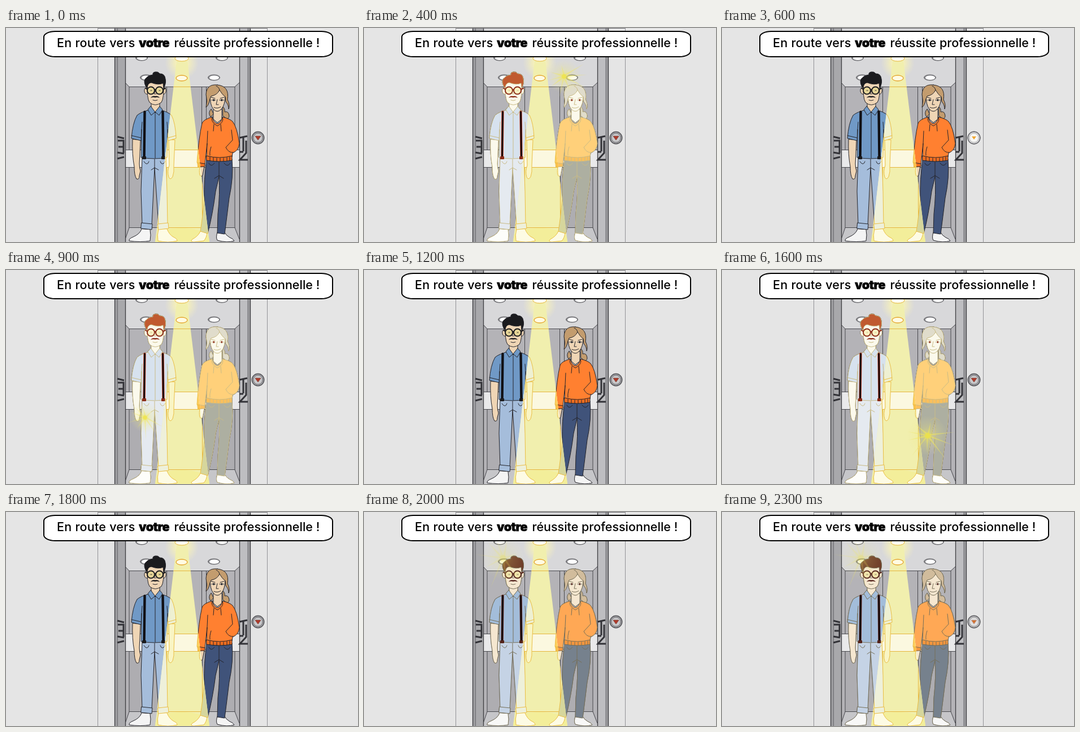
Animation of 623 by 380 pixels, one loop 2400 ms. Source, as an HTML page:

```html
<!DOCTYPE html>
<html lang="fr">
<head>
<meta charset="utf-8">
<title>Ascenseur</title>
<style>
html, body { margin: 0; width: 100%; height: 100%; overflow: hidden; background: #e5e5e5; }
svg { display: block; }
text { font: 500 21.5px Inter, "Open Sans", sans-serif; }
.airy { letter-spacing: .25px; }
.loud { font-weight: 900; stroke: #000; stroke-width: .5; letter-spacing: -.6px; }

.plain {
  --line: #24242a; --hair: #1b1b1e; --skin: #efd5b5; --shirt: #7099c6; --denim: #a5bddb;
  --strap: #111116; --edge: #111116; --rim: #1b1b1e; --lens: #e6d596;
  --blond: #c39c6e; --hood: #ff8030; --hem: #ee6d20; --navy: #40537a; --shoe: #f4f4f4;
}
.lit {
  --line: #c9bb86; --hair: #c05a30; --skin: #fbf9ec; --shirt: #d7e2ee; --denim: #e5eaf0;
  --strap: #140808; --edge: #c8452a; --rim: #8c2c18; --lens: #fbf3c4;
  --blond: #e0dccb; --hood: #ffd07a; --hem: #fbc05c; --navy: #adafa1; --shoe: #fdfdfa;
}
.warm {
  --line: #e9bd45; --hair: #c05a30; --skin: #f9f5c4; --shirt: #eef0d2; --denim: #eef0da;
  --strap: #8c6a20; --edge: #d8902a; --rim: #c08020; --lens: #fbf3c4;
  --blond: #e4dca8; --hood: #ffce5e; --hem: #fbbe48; --navy: #d6d69c; --shoe: #fdfbe4;
}
#cast { stroke: var(--line); stroke-linejoin: round; stroke-linecap: round; }
.hair { fill: var(--hair); } .skin { fill: var(--skin); } .shirt { fill: var(--shirt); }
.denim { fill: var(--denim); } .blond { fill: var(--blond); } .hood { fill: var(--hood); }
.hem { fill: var(--hem); } .navy { fill: var(--navy); } .shoe { fill: var(--shoe); }
.ink { fill: none; }
.edge { fill: none; stroke: var(--edge); stroke-width: 4.4; }
.strap { fill: none; stroke: var(--strap); stroke-width: 2.8; }
.rim { fill: var(--lens); stroke: var(--rim); stroke-width: 2; }
.dark { fill: var(--rim); stroke: none; }

/* ten pictures a second */
.glow { animation: glow .6s step-end infinite; }
.spot { animation: spot 2.4s step-end infinite; }
.call { animation: call .8s step-end infinite; }
@keyframes glow {
  0%, 100% { opacity: 0; }
  16.66% { opacity: .25; }
  33.33% { opacity: .5; }
  50%, 66.66% { opacity: 1; }
  83.33% { opacity: .5; }
}
@keyframes spot {
  0%, 100% { transform: translate(354px, 86px) rotate(-25deg) scale(.85); }
  25% { transform: translate(246px, 262px) rotate(35deg) scale(.75); }
  50% { transform: translate(364px, 294px) scale(1); }
  75% { transform: translate(246px, 82px) rotate(60deg) scale(1.1); }
}
@keyframes call {
  0%, 100% { opacity: 0; }
  62.5% { opacity: .5; }
  75% { opacity: 1; }
  87.5% { opacity: .5; }
}
</style>
</head>
<body>
<svg width="623" height="380" viewBox="0 0 623 380">
<defs>
  <clipPath id="cone"><path d="M302 58H321L360 380H264Z"/></clipPath>
  <radialGradient id="halo">
    <stop offset="0" stop-color="#fffbd0"/>
    <stop offset=".4" stop-color="#f8f2b4" stop-opacity=".8"/>
    <stop offset="1" stop-color="#f5f0c4" stop-opacity="0"/>
  </radialGradient>
  <radialGradient id="spark">
    <stop offset="0" stop-color="#f1e65a" stop-opacity=".65"/>
    <stop offset=".4" stop-color="#efe97e" stop-opacity=".28"/>
    <stop offset="1" stop-color="#f2ec96" stop-opacity="0"/>
  </radialGradient>
  <g id="lamp">
    <ellipse rx="10.500" ry="5" fill="#88888c" stroke="#66666a"/>
    <ellipse cx=".5" cy=".3" rx="8.500" ry="3.800" fill="#fff"/>
  </g>
  <path id="seams" fill="none" d="M211 97L218 104.500H405L413 97M218 104V216M218 248V355M405 104V216M405 248V355M284.500 104V216M346.500 104V216M354.500 104V216M284.500 248V355M347.500 248V355M211 216.500H413M211 247.500H413M211 375L218 354.500H405L413 375"/>

  <g id="cast">
    <!-- man -->
    <path class="skin" d="M224 198Q223 225 227 246Q227 262 231 268Q236 270 236 262L238 254Q236 248 236 241L238 199Z"/>
    <path class="skin" d="M288 199L289 244Q285 254 288 265Q291 271 295 264Q298 256 297 244L299 199Z"/>
    <path class="shoe" d="M240 357Q237 366 225 371Q217 374 218 378Q238 381 255 378Q257 368 255 358Z"/>
    <path class="shoe" d="M270 357Q267 368 269 378Q287 382 303 378Q303 374 296 371Q289 367 285 357Z"/>
    <path class="denim" d="M241 229L239 290L241 350L258 350L263 248L270 350L286 350L285 290L283 229Z"/>
    <path class="denim" d="M240 346L259 348L258 358L239 356ZM269 348L287 346L288 356L270 358Z"/>
    <path class="ink" d="M263 233V248M244 237Q250 246 253 237M282 237Q276 246 273 237M257 252L263 248L270 252"/>
    <path class="shirt" d="M255 145Q239 149 232 155Q224 169 222 196L239 200L240 180L239 230Q263 234 285 230L286 180L287 200L301 196Q300 169 293 155Q287 149 272 145Z"/>
    <path class="ink" d="M240 180L241 167M286 180L285 167M222 191L239 195M287 195L301 191M264 152V231"/>
    <path class="edge" d="M245.500 149L244.500 231M277.500 149L278.500 231"/>
    <path class="strap" d="M245.500 149L244.500 231M277.500 149L278.500 231"/>
    <path class="dark" d="M241 228H248V233H241ZM275 228H282V233H275Z"/>
    <path class="skin" d="M257 130V144L264 151L272 144V130Z"/>
    <path class="shirt" d="M256 139L251 145L257 155L264 149L271 155L277 145L272 139L264 149Z"/>
    <path class="skin" d="M250 106Q244 105 245 113Q247 119 251 117M279 106Q284 105 283 113Q281 119 278 117"/>
    <path class="skin" d="M250 96Q249 125 254 132Q264 141 275 132Q280 125 279 96Z"/>
    <path class="hair" d="M250 107L247 103Q242 92 249 88Q252 84 260 83Q259 79 264 78Q269 77 272 81Q281 81 282 90Q284 98 279 107L278 98Q270 102 257 97Q250 98 250 107Z"/>
    <g class="rim">
      <circle cx="256.500" cy="111" r="6.500"/><circle cx="271.500" cy="111" r="6.500"/>
      <path d="M263 109.500H265M247 107L250 109M278 109L282 107"/>
    </g>
    <path class="dark" d="M256 124Q259 120 264 121Q269 120 272 124Q267 122.500 264 123.500Q260 122.500 256 124Z"/>
    <path class="ink" d="M264 112L262 117H266M260 128Q264 130 268 128M256 111H258M271 111H273"/>

    <!-- woman -->
    <path class="blond" d="M384 140Q388 143 387 149Q394 147 395 156Q395 161 390 161L384 156ZM363 144Q357 150 362 158L367 153Z"/>
    <path class="skin" d="M344 243Q341 253 343 261Q346 266 348 261L351 245Z"/>
    <path class="shoe" d="M344 361Q340 370 330 375Q325 379 332 380L350 378Q355 373 356 363Z"/>
    <path class="shoe" d="M374 363Q371 372 374 377Q391 382 404 378Q402 374 396 372Q389 368 387 363Z"/>
    <path class="navy" d="M355 233Q350 272 351 302Q348 336 344 361L357 365Q366 330 371 290L377 264Q379 294 375 330L374 364L387 366Q391 335 395 302Q403 265 400 233Z"/>
    <path class="ink" d="M377 238V264M359 240Q363 248 369 240M397 240Q392 248 386 240M369 267L377 262L385 267"/>
    <path class="skin" d="M367 145V162L374 168L382 162V145Z"/>
    <path class="hood" d="M365 158Q350 162 347 169Q341 195 338 239Q345 246 352 242L356 205L355 229Q378 237 400 229L401 222Q412 218 413 205Q409 176 401 166Q396 161 383 158Q381 168 374 170Q367 168 365 158Z"/>
    <path class="hem" d="M355 227Q378 233 400 227V235Q378 239 355 235ZM339 239L352 241V246L340 247Z"/>
    <path class="ink" d="M356 205L357 183M365 158Q361 166 374 174Q387 167 383 158M368 171L367 183M380 171L381 183M399 181L401 199L389 212Q394 222 402 221M363 211Q360 220 361 226M361 229V236M367 230V237M373 231V237M379 231V237M385 231V237M391 230V236M396 229V235"/>
    <path class="skin" d="M361 118Q361 137 367 144Q374 152 381 144Q388 137 388 118L374 106Z"/>
    <path class="blond" d="M374 101Q355 99 354 118Q357 130 354 141Q359 137 361 126L363 121Q374 119 378 110Q383 119 388 122L389 131Q394 136 394 144Q397 137 392 127Q396 103 374 101Z"/>
    <path class="ink" d="M378 110Q377 105 372 103M363 123L370 125M379 125L386 123M374 127L372 136H376M368 141Q374 144 380 140"/>
    <path fill="#fff" stroke-width=".6" d="M364 128Q367 125.500 371 128Q367 130.500 364 128ZM378 128Q382 125.500 386 128Q382 130.500 378 128Z"/>
    <path class="dark" d="M366.500 126.500H369V129.500H366.500ZM380.500 126.500H383V129.500H380.500Z"/>
  </g>

  <g id="flare">
    <circle r="36" fill="url(#spark)"/>
    <path fill="#f1e85c" opacity=".5" d="M-3-2L-22-20L0-4L5-24L3-3L48-6L4 0L45 17L4 3L32 42L1 4L-1 32L-2 4L-28 36L-4 3L-34 8L-5 0L-36-7Z"/>
    <circle r="5" fill="#eee33c" opacity=".6"/>
  </g>
</defs>

<rect width="623" height="380" fill="#e5e5e5"/>

<!-- lift car -->
<path fill="#d8d8da" d="M211 0H413V105H211Z"/>
<path fill="#b4b3b7" d="M211 97L218 104H405L413 97V380H211Z"/>
<path fill="#aeadb1" d="M218 248H405V355H218Z"/>
<path fill="#c6c6c9" d="M211 375L218 355H405L413 375V380H211Z"/>
<path fill="#e9e9ea" d="M211 216H413V248H211Z"/>
<use href="#seams" stroke="#48484d"/>
<use href="#lamp" x="240" y="53"/><use href="#lamp" x="382" y="53"/>
<use href="#lamp" x="248" y="88"/><use href="#lamp" x="368" y="88"/>

<!-- doors -->
<path fill="#9c9c9f" d="M192 0H197V380H192ZM428 0H433V380H428Z"/>
<path fill="#a8a8ab" d="M197 0H211V380H197Z"/>
<path fill="#bebec1" d="M413 0H428V380H413Z"/>
<g fill="none" stroke="#3c3c40">
  <path d="M192.500 0V380M211.500 0V380M413.500 0V380M432.500 0V380" stroke-width="1.300"/>
  <path d="M197.500 0V380M428 0V380M162 .5H463" stroke="#6a6a6e"/>
  <path d="M162.500 0V380M462.500 0V380" stroke="#929296"/>
  <path stroke="#333338" stroke-width="3" d="M197 193L209 196M198 200H208V222M199 211H208M197 221L209 223M197 232L209 229M413 195L427 192M420 194V219M413 220H420M425 200V222L414 234H428"/>
</g>

<!-- call button -->
<g stroke="#4b4b4f">
  <circle cx="446" cy="195" r="10.800" fill="#9b9b9f" stroke-width="1.300"/>
  <circle cx="446" cy="195" r="8" fill="#c9c9cb" stroke="#77777b"/>
  <path d="M441 192H451L446 199Z" fill="#b13a2a" stroke="#70372e" stroke-width=".7"/>
</g>
<g class="call">
  <circle cx="446" cy="195" r="10.800" fill="#d6d6d8" stroke="#66666a" stroke-width="1.300"/>
  <circle cx="446" cy="195" r="8" fill="#f7f7f5" stroke="#b9b9ba"/>
  <path d="M442 192.500H450L446 198Z" fill="#f0a42c"/>
</g>

<use href="#cast" class="plain"/>
<g class="glow"><use href="#cast" class="lit"/></g>

<!-- ceiling light -->
<circle cx="311" cy="62" r="30" fill="url(#halo)"/>
<g clip-path="url(#cone)">
  <path fill="#f1efae" d="M260 50H364V380H260Z"/>
  <path fill="#fbf8e0" d="M260 216H364V248H260Z"/>
  <ellipse cx="311" cy="376" rx="50" ry="21" fill="#f3ee9a"/>
  <use href="#seams" stroke="#e6b53c"/>
  <use href="#cast" class="warm"/>
</g>
<ellipse cx="311" cy="54" rx="12" ry="5" fill="#fffef0" stroke="#e7b53a"/>
<ellipse cx="311" cy="89" rx="10" ry="5" fill="#fffbe2" stroke="#e5a52c" stroke-width="1.300"/>

<g class="glow"><g class="spot"><use href="#flare"/></g></g>

<!-- banner -->
<rect x="67" y="6" width="511" height="45" rx="20" ry="10" fill="#fff" stroke="#000" stroke-width="2"/>
<text class="airy" x="90" y="33.500">En route vers</text>
<text class="loud" x="235" y="33.500">votre</text>
<text x="297.500" y="33.500">réussite professionnelle !</text>
</svg>
</body>
</html>
```
